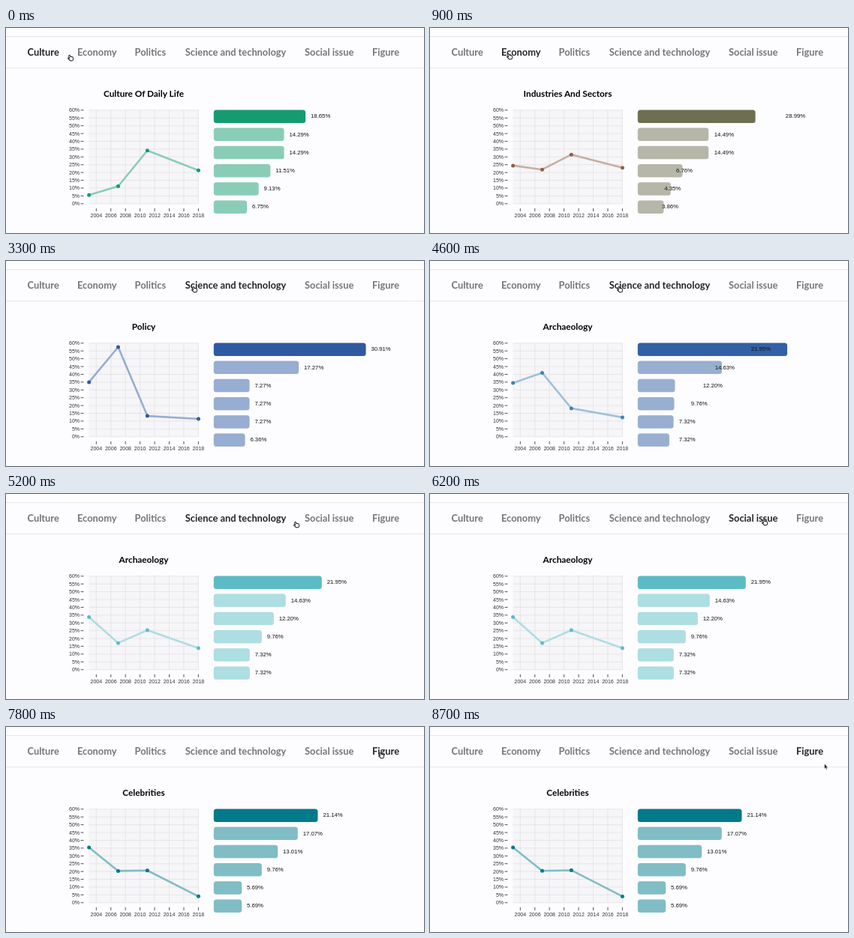
Recreate the animation shown at these times as an HTML page. Size 557x274 px, loop 8800 ms.

```html
<!DOCTYPE html>
<html lang="en">
<head>
<meta charset="utf-8">
<style>
html, body { margin: 0; width: 100%; height: 100%; overflow: hidden; background: #fdfcfe; }
svg { display: block; }
.tab, .title { font: 700 12.85px Lato, sans-serif; }
.title { font-size: 11.8px; text-anchor: middle; }
.axis { font: 7px "Liberation Sans", Arial, sans-serif; fill: #333; }
.value { font: 7.75px "Liberation Sans", Arial, sans-serif; fill: #111; }
</style>
</head>
<body>
<svg id="stage" width="557" height="274"></svg>
<script>
const LOOP = 8800, LINE_MS = 780, BAR_MS = 390, FADE_MS = 150;
const BAR_X = 276.8, PX_PER_PERCENT = 6.56;
const YEARS = [2003, 2007, 2011, 2018];

// hover: when the tab darkens; start: when the chart begins to change
const views = [
  { tab: 'Culture', x: 28.5, hover: -999, start: -9999, title: 'Culture Of Daily Life', color: [21, 155, 111],
    line: [5.5, 11.2, 34.1, 21.4], bars: [18.65, 14.29, 14.29, 11.51, 9.13, 6.75] },
  { tab: 'Economy', x: 95, hover: 300, start: 705, title: 'Industries And Sectors', color: [196, 68, 54],
    line: [33.1, 26.8, 30.3, 23.8], bars: [28.99, 14.49, 14.49, 6.76, 4.35, 3.86] },
  { tab: 'Politics', x: 171.5, hover: 1740, start: 2110, title: 'Policy', color: [47, 90, 162],
    line: [35, 57.5, 13.3, 11.4], bars: [30.91, 17.27, 7.27, 7.27, 7.27, 6.36] },
  { tab: 'Science and technology', x: 238.8, hover: 3050, start: 4505, title: 'Archaeology', color: [91, 188, 197],
    line: [33.7, 17.1, 25.3, 13.8], bars: [21.95, 14.63, 12.2, 9.76, 7.32, 7.32] },
  { tab: 'Social issue', x: 398, hover: 5600, start: 6405, title: 'Crime Issues', color: [199, 22, 127],
    line: [34.3, 18, 12.9, 6.6], bars: [23.81, 20.95, 20, 18.1, 4.76, 2.86] },
  { tab: 'Figure', x: 488, hover: 7130, start: 7305, title: 'Celebrities', color: [2, 122, 138],
    line: [35.4, 20.4, 20.8, 4], bars: [21.14, 17.07, 13.01, 9.76, 5.69, 5.69] }
];

// time, x, y
const cursorPath = [
  [0, 86, 40], [600, 106, 38], [1600, 106, 38], [1900, 187, 37], [2950, 187, 37],
  [3300, 251, 38], [4000, 251, 38], [4300, 253, 38], [4750, 253, 38], [5200, 387, 41],
  [5450, 387, 41], [6200, 446, 38], [7000, 446, 38], [7300, 500, 38], [8400, 500, 38], [8700, 527, 53]
];

const stage = document.getElementById('stage');
function add(tag, attrs, text) {
  const el = document.createElementNS('http://www.w3.org/2000/svg', tag);
  set(el, attrs);
  if (text) el.textContent = text;
  stage.append(el);
  return el;
}
function set(el, attrs) {
  for (const k in attrs) el.setAttribute(k, attrs[k]);
}
const clamp = v => Math.max(0, Math.min(1, v));
const mix = (a, b, p) => a + (b - a) * p;
const mixAll = (a, b, p) => a.map((v, i) => mix(v, b[i], p));
const rgb = c => `rgb(${c.map(Math.round)})`;
const pale = c => rgb(mixAll(c, [255, 255, 255], .5));
const outQuart = p => 1 - (1 - p) ** 4;
const inOutCubic = p => p < .5 ? 4 * p ** 3 : 1 - 4 * (1 - p) ** 3;
const yearX = year => 110.6 + (year - 2003) * 9.72;
const percentY = v => 234.8 - v * 125 / 60;

for (const y of [11, 53]) add('rect', { y, width: 557, height: 1, fill: '#e6e5e8' });
const tabs = views.map(v => add('text', { class: 'tab', x: v.x, y: 37 }, v.tab));
const title = add('text', { class: 'title', x: 183.5, y: 92.3 });

add('rect', { x: 110.5, y: 109.8, width: 146.5, height: 125, fill: '#f6f5f7' });
let grid = '', ticks = '';
for (let v = 0; v <= 60; v += 5) {
  const y = percentY(v);
  grid += `M110.5 ${y}H257`;
  ticks += `M99.5 ${y}h4`;
  add('text', { class: 'axis', x: 98, y: y + 2.5, 'text-anchor': 'end' }, v + '%');
}
for (let year = 2004; year <= 2018; year += 2) {
  const x = yearX(year);
  grid += `M${x} 109.8V235`;
  ticks += `M${x} 241v4`;
  add('text', { class: 'axis', x, y: 252.5, 'text-anchor': 'middle' }, year);
}
add('path', { d: grid, stroke: '#e2e1e4', 'stroke-width': .8 });
add('path', { d: ticks, stroke: '#444', 'stroke-width': .9 });

const line = add('polyline', { fill: 'none', 'stroke-width': 2.6, 'stroke-linejoin': 'round' });
const dots = YEARS.map(year => add('circle', { cx: yearX(year), r: 2.5 }));
const rows = views[0].bars.map((_, i) => ({
  bar: add('rect', { x: BAR_X, y: 109.4 + i * 24.2, height: 17.5, rx: 3.5 }),
  label: add('text', { class: 'value', y: 120.4 + i * 24.2 })
}));

const hand = add('path', {
  d: 'M-2.2-3.6q.9-.8 1.5.4l.7 1.7q.6-.7 1.2 0 .7-.5 1.2.2 1-.4 1.3.7l.3 1.7q.2 1.4-.5 2.4l-3.7.6q-1.4-1.3-3.6-3.3-.4-1.1.9-1l1.2.7-1.1-3.4z',
  fill: '#fff', stroke: '#222', 'stroke-width': 1.1, 'stroke-linejoin': 'round'
});
const arrow = add('path', {
  d: 'M-1.5-4v7l1.6-1.4 1.1 2.5 1.2-.5-1.1-2.4h2.1z',
  fill: '#222', stroke: '#fff', 'stroke-width': .5
});

function drawTabs(t) {
  views.forEach((v, i) => {
    const next = views[i + 1];
    const on = clamp((t - v.hover) / FADE_MS) - (next ? clamp((t - next.hover) / FADE_MS) : 0);
    tabs[i].setAttribute('fill', rgb(mixAll([117, 117, 120], [36, 36, 39], on)));
  });
}

function drawChart(t) {
  const index = views.findLastIndex(v => t >= v.start);
  const view = views[index], before = views[Math.max(0, index - 1)];
  const lineP = outQuart(clamp((t - view.start) / LINE_MS));
  const barP = inOutCubic(clamp((t - view.start) / BAR_MS));

  title.textContent = view.title;
  const lineColor = mixAll(before.color, view.color, lineP);
  const ys = mixAll(before.line, view.line, lineP).map(percentY);
  set(line, { points: ys.map((y, i) => [yearX(YEARS[i]), y]).join(' '), stroke: pale(lineColor) });
  dots.forEach((dot, i) => set(dot, { cy: ys[i], fill: rgb(lineColor) }));

  const barColor = mixAll(before.color, view.color, barP);
  rows.forEach(({ bar, label }, i) => {
    const value = view.bars[i];
    set(bar, {
      width: mix(before.bars[i], value, barP) * PX_PER_PERCENT,
      fill: i ? pale(barColor) : rgb(barColor)
    });
    label.setAttribute('x', BAR_X + value * PX_PER_PERCENT + 6.9);
    label.textContent = value.toFixed(2) + '%';
  });
}

function drawCursor(t) {
  const i = cursorPath.findLastIndex(k => t >= k[0]);
  const a = cursorPath[i], b = cursorPath[i + 1] || a;
  const p = inOutCubic(clamp((t - a[0]) / (b[0] - a[0] || 1)));
  const place = `translate(${mix(a[1], b[1], p)} ${mix(a[2], b[2], p)})`;
  const outside = t > 8600;
  set(hand, { transform: place + ' scale(.88 .95)', visibility: outside ? 'hidden' : 'visible' });
  set(arrow, { transform: place, visibility: outside ? 'visible' : 'hidden' });
}

const began = performance.now();
function frame() {
  const t = (performance.now() - began) % LOOP;
  drawTabs(t);
  drawChart(t);
  drawCursor(t);
  requestAnimationFrame(frame);
}
frame();
</script>
</body>
</html>
```
